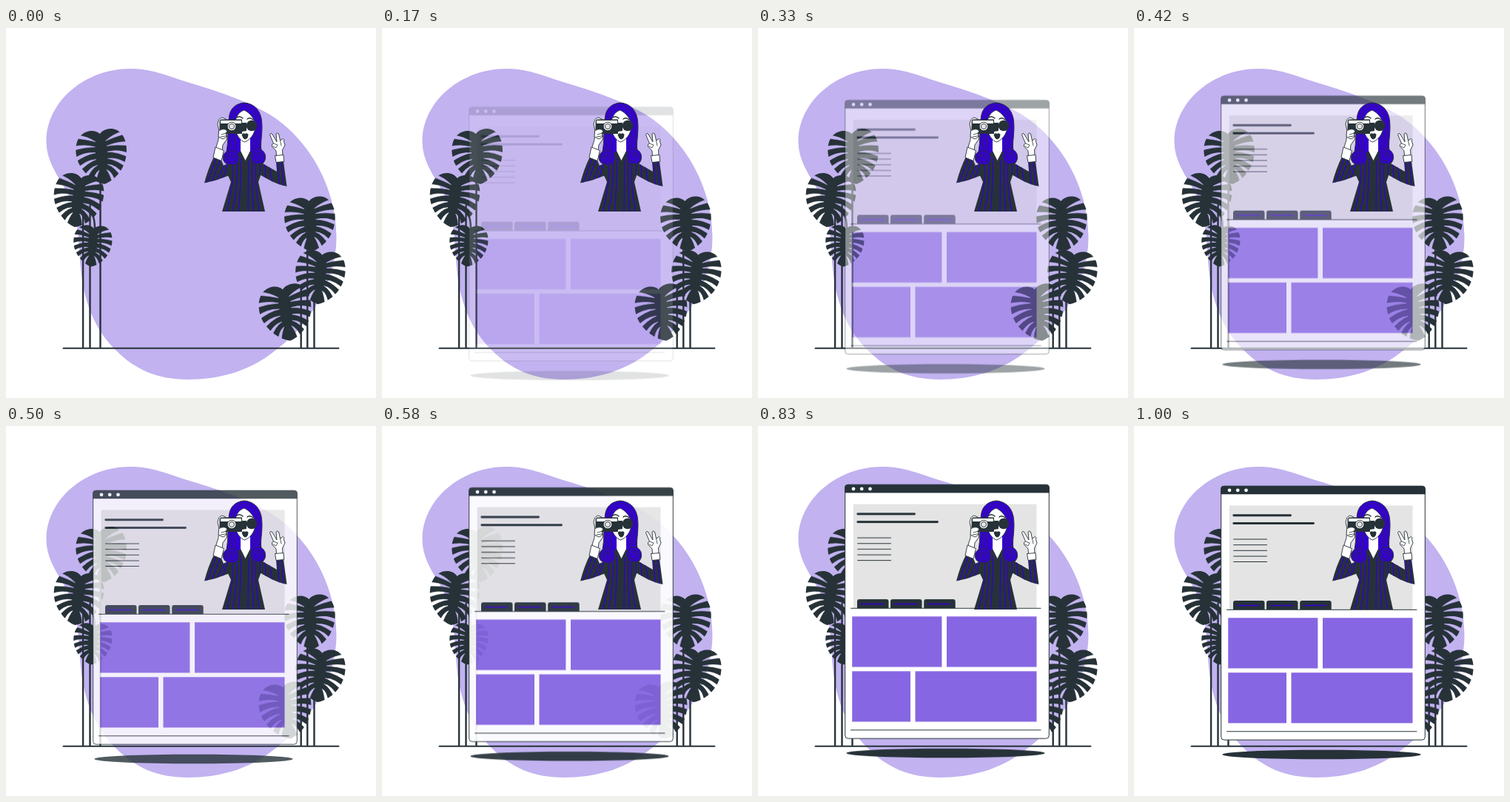
These frames come from a looping animation (500 px wide and 500 px high, 1040 ms). An HTML page without scripts:

```html
<!DOCTYPE html>
<html lang="en">
<head>
<meta charset="utf-8">
<title>Portfolio page</title>
<style>
  html, body { margin: 0; height: 100%; overflow: hidden; background: #fff; }
  svg { display: block; width: 100%; height: 100%; }
  .ink { fill: #263238; }
  .blue { fill: #3500cf; }
  .block { fill: #8666e2; }
  .white { fill: #fff; }
  .line { fill: none; stroke: #263238; stroke-linecap: round; stroke-linejoin: round; }
  .stripe { fill: none; stroke: #3500cf; stroke-width: 1.3; }
  .skin { fill: #fff; stroke: #263238; stroke-width: .9; stroke-linejoin: round; }
  .page { animation: rise 1040ms infinite; }
  @keyframes rise {
    0% {
      opacity: 0;
      transform: translateY(30px);
      animation-timing-function: cubic-bezier(.349, .065, .499, 1.37);
    }
    93.27%, 100% { opacity: 1; transform: translateY(0); }
  }
</style>
</head>
<body>
<svg viewBox="0 0 500 500" xmlns="http://www.w3.org/2000/svg">
  <defs>
    <path id="slits" stroke="#000" stroke-width=".6" d="M7-21Q17-29 31-32l2 4Q18-25 7-21M8-14Q22-19 38-17v5Q22-15 8-14M8-6Q24-9 39 0l-1 5Q22-5 8-6M8 3Q22 2 37 15l-3 4Q20 6 8 3M7 11Q18 12 29 28l-4 3Q16 15 7 11M5 18Q12 21 16 37l-4 2Q9 24 5 18"/>
    <mask id="cuts" maskUnits="userSpaceOnUse" x="-45" y="-45" width="90" height="90">
      <rect x="-45" y="-45" width="90" height="90" fill="#fff"/>
      <use href="#slits"/>
      <use href="#slits" transform="scale(-1 1)"/>
    </mask>
    <path id="leaf" class="ink" mask="url(#cuts)" d="M0-31C5-37 18-40 26-32C36-24 36-4 31 8C26 22 14 33 1 37C-13 34-26 20-31 8C-36-4-36-22-26-31C-18-38-6-38 0-31Z"/>
    <path id="tab" class="ink" d="M134 248v-9q0-3 3-3h36.500q3 0 3 3v9z"/>
    <path id="torso" d="M302 182L317 166L323.500 179L330 166L343 181L347 191L341 208L350 248H292L304 208L298 195Z"/>
    <path id="armL" d="M281 174L291 179L294 186L304 181L305 198L283 206L268 209.500Q273 190 281 174Z"/>
    <path id="armR" d="M365 181L375 180.500L379.500 214Q366 211 357 206L339 196L342 180L352 186L366 194Z"/>
    <clipPath id="torsoClip"><use href="#torso"/></clipPath>
    <clipPath id="armLClip"><use href="#armL"/></clipPath>
    <clipPath id="armRClip"><use href="#armR"/></clipPath>
  </defs>

  <path fill="#c2b2f0" d="M168 55C192 55 208 61 228 67.500C262 79 314 92 355 116C409 149 446.500 215 446.500 282C447 343 410 404 357 441C326 464 288 475 246 475C204 475 174 461 149 436C120 408 105 370 101 325C98 290 98 262 87 232C78 208 54.500 186 54.500 153C55 98 108 55 168 55Z"/>

  <!-- plants -->
  <path class="line" stroke-width="1.900" d="M77.500 432.800H449.500"/>
  <path class="line" stroke-width="2.400" d="M104.100 250V432M113.500 240V432M127.500 200V432M118 255Q120 262 120 272M407.300 260V432M416.500 365V432M398.700 352V432"/>
  <use href="#leaf" transform="translate(129.500 174) rotate(-5)"/>
  <use href="#leaf" transform="translate(97.300 233) rotate(8) scale(.98)"/>
  <use href="#leaf" transform="translate(116.800 294.500) rotate(5) scale(.76)"/>
  <use href="#leaf" transform="translate(411 265) rotate(-3)"/>
  <use href="#leaf" transform="translate(424 337) rotate(6) scale(.98)"/>
  <use href="#leaf" transform="translate(378.300 385) rotate(-8) scale(1.030)"/>

  <!-- browser page -->
  <g class="page">
    <ellipse class="ink" cx="253.500" cy="444" rx="134.200" ry="6.300"/>
    <rect x="117.700" y="81.200" width="275.600" height="343" rx="4" fill="#fff" stroke="#263238"/>
    <path class="ink" d="M117.200 92.200V85q0-4 4-4H389.800q4 0 4 4v7.200z"/>
    <g class="white">
      <circle cx="129" cy="86.800" r="2.400"/>
      <circle cx="140.200" cy="86.800" r="2.400"/>
      <circle cx="151.500" cy="86.800" r="2.400"/>
    </g>
    <rect x="128.700" y="107.500" width="247.800" height="140.700" fill="#e4e4e4"/>
    <path class="line" stroke-width="2.900" d="M134.800 120.800H211.500M134.800 131.500H242.500"/>
    <path class="line" d="M134.700 153H179.500M134.700 160.700H179.500M134.700 168.300H179.500M134.700 176H179.500M134.700 183.500H179.500"/>
    <use href="#tab"/>
    <use href="#tab" x="45"/>
    <use href="#tab" x="90.200"/>
    <path class="stripe" d="M139 242.500h31M184 242.500h31M229 242.500h31"/>
    <path class="line" d="M125.500 248.300H382M125.500 412.800H382"/>
    <g class="block">
      <rect x="127.200" y="259.300" width="121.200" height="68.200"/>
      <rect x="255" y="259.300" width="121.500" height="68.200"/>
      <rect x="127.200" y="333.300" width="78.800" height="68.200"/>
      <rect x="212.500" y="333.300" width="164" height="68.200"/>
    </g>
  </g>

  <!-- photographer -->
  <path class="blue" stroke="#263238" d="M322 101C311 102 303 108 301.500 120C299 137 301 153 298 167C291 171 292 181 299 184C306 187 314 185 316 178L323 182L331 178C334 185 343 187 348 182C353 176 350 169 345 165C343 154 348 139 345 122C342 108 333 102 322 101Z"/>
  <path class="line" stroke-width=".7" d="M320 104C309 109 305 121 305 136S305 158 302 167M324 104C337 109 341 122 341 137S339 156 343 166M309 140Q311 156 307 168M337 142Q333 156 337 170"/>
  <path class="white" d="M317 148V167L323.500 180L330 167V148Z"/>
  <path class="skin" d="M322 111C314 113 309 122 309.500 133C310 144 317 153 322.500 154C329 152 336 144 337 134C337 123 330 115 322 111Z"/>
  <path class="line" stroke-width="1.400" d="M312 121Q316 118 320 122M326 123Q330 120 334 124"/>
  <circle class="ink" cx="332" cy="132" r="7.300"/>
  <path class="ink" d="M318.500 144Q321 141 323 143Q326 141 327.500 144Q327 150 323 150.500Q320 149.500 318.500 144Z"/>

  <use href="#torso" class="ink"/>
  <path class="stripe" clip-path="url(#torsoClip)" d="M306 182Q309 208 298 249M312 176Q314 210 306 249M317 176Q318 210 314 249M328 178L327 249M333 176Q332 210 335 249M338 178Q335 210 343 249"/>
  <use href="#armL" class="ink"/>
  <path class="stripe" clip-path="url(#armLClip)" d="M285 174L271 211M290 177L277 211M296 184L284 209M301 181L291 208"/>
  <use href="#armR" class="ink"/>
  <path class="stripe" clip-path="url(#armRClip)" d="M344 178L343 201M350 183L351 205M356 187L360 209M367 179L369 213M372 179L375.500 215"/>

  <g class="blue" stroke="#263238" stroke-width=".8">
    <circle cx="305.500" cy="175.500" r="9.500"/>
    <circle cx="340.500" cy="173.500" r="10"/>
  </g>
  <path class="line" stroke-width=".8" d="M298 177C298 168 311 168 311 176S301 183 301 176S307 173 307 177M347 174C347 165 334 166 334 174S345 181 344 174S338 171 338 175"/>

  <!-- camera and hands -->
  <path class="skin" d="M288 139L286 130Q287 122 292 121L297 123L296 137L299 143L298 151L293 158L292 167L283 164L287 151Z"/>
  <path class="skin" d="M283 161L294.500 165.500L291 179.500L280 175Z"/>
  <path class="ink" d="M288.500 127Q288.500 123.500 291 123.500H319V128H325V139L319 140V143H291Q288.500 143 288.500 140Z"/>
  <path class="white" d="M290 125h28v4h-28z"/>
  <circle cx="305" cy="133" r="5.800" class="skin"/>
  <circle cx="305" cy="133" r="3.600" fill="#e4e4e4" stroke="#263238" stroke-width=".9"/>
  <path class="skin" d="M287.500 139Q293 135 298 138Q300 140 297 142L298 146Q297 149 293 150L287 147Z"/>
  <path class="line" stroke-width=".8" d="M291 144L298 142M290 147L297 146"/>

  <path class="skin" d="M365.500 173L365 166L359.500 160Q358.500 157 361.500 156L356.500 144Q357 141.500 359.500 143L366 154L365 143Q366.500 141 368.500 143L370.500 152L374.500 149.500Q376.500 150 375.500 153.500L377 158L373.500 165L374 173Z"/>
  <path class="line" stroke-width=".8" d="M361.500 156L367 158L365 162L361 160M370.500 152L372 159"/>
  <path class="skin" d="M363.500 172.500L375 171.500L375.700 180.500L365 181.500Z"/>
</svg>
</body>
</html>
```
